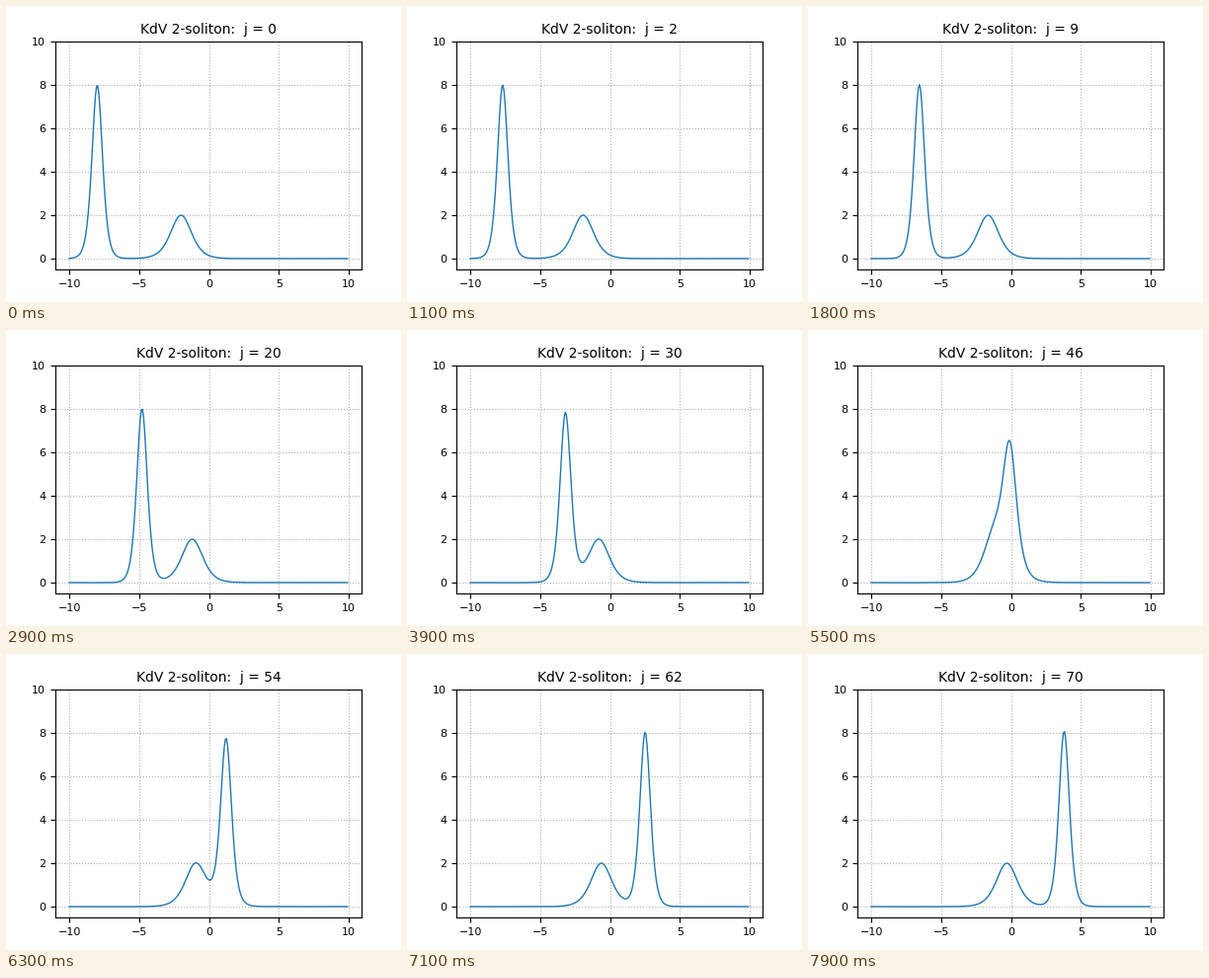
A matplotlib script that plays this animation: 400 px wide and 300 px high, repeating every 8000 ms.

```python
import numpy as np
import matplotlib.pyplot as plt
from matplotlib.animation import FuncAnimation

N, DT, SUBSTEPS, LAST = 256, 1e-5, 1000, 70
HOLD = 9  # extra frames spent on the initial state

x = -10 + 20 * np.arange(N) / N
k = 2 * np.pi / 20 * np.arange(N // 2 + 1)


def soliton(speed, x0):
    return speed / 2 / np.cosh(np.sqrt(speed) / 2 * (x - x0)) ** 2


def solve():
    """Split-step spectral solution of u_t + 6 u u_x + u_xxx = 0."""
    u = soliton(16, -8) + soliton(4, -2)
    states = [u]
    disperse = np.exp(1j * k**3 * DT)
    steepen = 3j * k * DT
    rfft, irfft = np.fft.rfft, np.fft.irfft
    v = rfft(u)
    for _ in range(LAST):
        for _ in range(SUBSTEPS):
            v = v * disperse
            w = irfft(v, N)
            v -= steepen * rfft(w * w)
        states.append(irfft(v, N))
    return states


states = solve()

plt.rcParams["font.family"] = "DejaVu Sans"
fig, ax = plt.subplots(figsize=(4, 3), dpi=100)
line, = ax.plot(x, states[0], color="#1f77b4", lw=1)
title = ax.set_title("", fontsize=10)
ax.set_ylim(-0.5, 10)
ax.set_xticks(range(-10, 11, 5))
ax.set_yticks(range(0, 11, 2))
ax.tick_params(labelsize=8)
ax.grid(ls=":")


def update(n):
    j = max(0, n - HOLD)
    line.set_ydata(states[j])
    title.set_text(f"KdV 2-soliton:  j = {j}")
    return line, title


anim = FuncAnimation(fig, update, frames=LAST + HOLD + 1, interval=100,
                     repeat=True, repeat_delay=0, blit=False)
plt.show()
```
